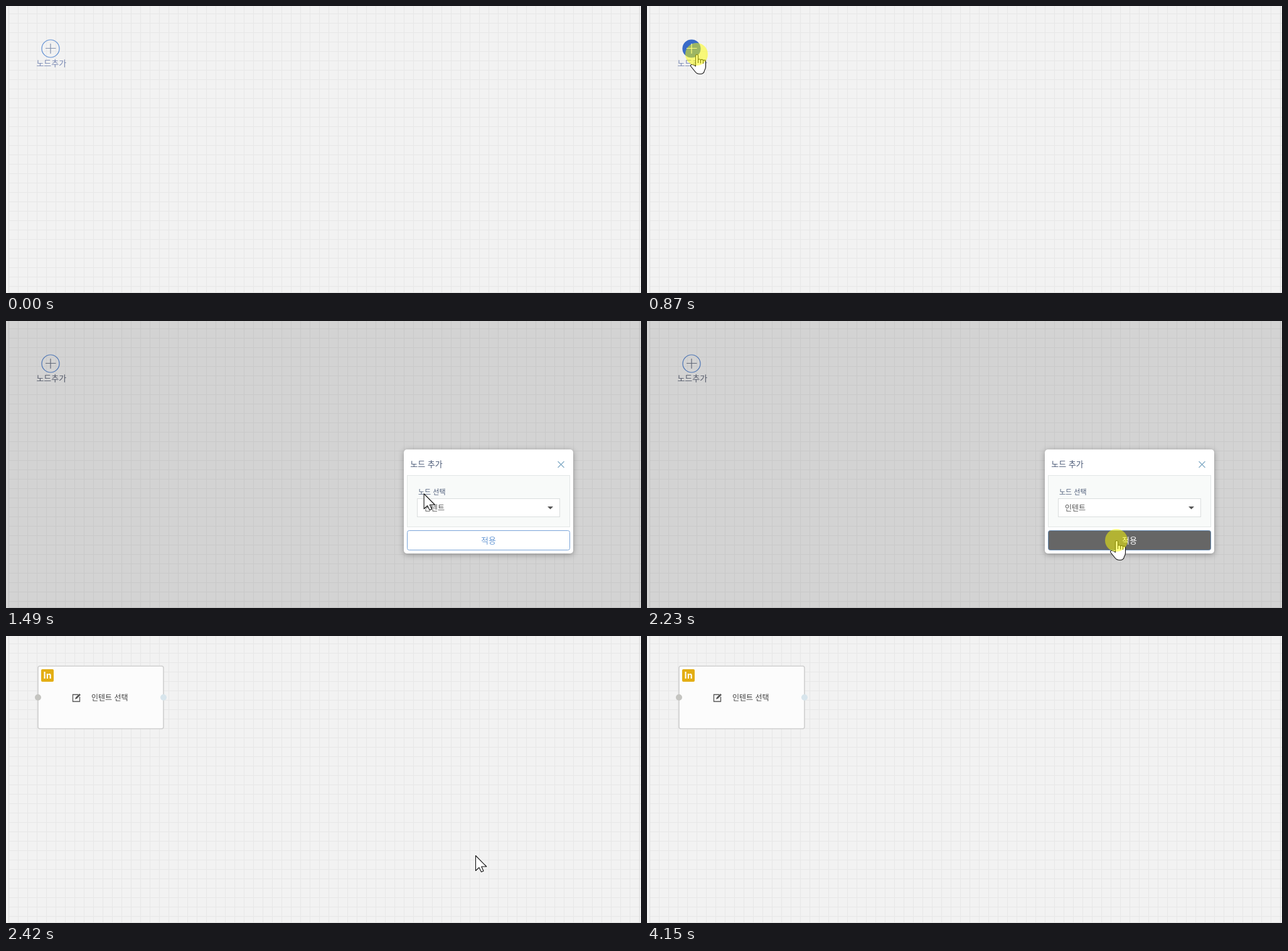
An HTML page that plays this animation: 1012 px wide and 458 px high, repeating every 4.22 s.

```html
<!DOCTYPE html>
<html lang="ko">
<head>
<meta charset="utf-8">
<title>노드 추가</title>
<style>
  html, body { margin: 0; height: 100%; overflow: hidden; background: #f2f2f2; }
  svg { display: block; width: 1012px; height: 458px; }
  text { font: 13px "Noto Sans CJK KR", "Noto Sans CJK", "Noto Sans", sans-serif; }
  .mid { text-anchor: middle; }
  .crisp { shape-rendering: crispEdges; }
  #add circle { fill: none; stroke: #5f8fd3; }
  #add path { stroke: #8391ad; }
  #add text { fill: #7a89b4; }
  #add.hover circle { fill: #396bc8; stroke: #396bc8; }
  #add.hover path { stroke: #fff; }
  #add.covered circle { stroke: #5584cf; }
  #add.covered path { stroke: #71798a; }
  #add.covered text { fill: #62687a; }
  #dialog { filter: drop-shadow(0 2px 5px rgba(0, 0, 0, .32)); }
  #apply rect { fill: #fff; stroke: #78a3d8; }
  #apply text { fill: #6b9bd6; }
  #apply.hover rect { fill: #666; stroke: #6489b0; }
  #apply.hover text { fill: #fff; font-weight: 500; }
</style>
</head>
<body>
<svg viewBox="0 0 1012 458">
  <defs>
    <pattern id="grid" x="4" y="12" width="15" height="15" patternUnits="userSpaceOnUse">
      <path class="crisp" d="M0 0H15V1H1V15H0Z" fill="#e7e7e7"/>
    </pattern>
  </defs>
  <rect width="1012" height="458" fill="#f2f2f2"/>
  <rect x="4" width="1008" height="458" fill="url(#grid)"/>
  <path class="crisp" d="M4.5 0V458M4 457.5H1012M1009.5 0V458" stroke="#dcdcdc"/>

  <g id="add">
    <circle cx="71" cy="68" r="14" stroke-width="1.2"/>
    <path d="M63 67.5H79.5M71 60V76" stroke-width="1.2"/>
    <text class="mid" x="72.3" y="95.5">노드추가</text>
  </g>

  <g id="node">
    <rect x="51" y="48" width="200" height="100" rx="3" fill="#fcfcfc" stroke="#cfcfcf" stroke-width="1.6"/>
    <circle cx="51" cy="98" r="5" fill="#c4c4c0"/>
    <circle cx="251" cy="98" r="5" fill="#d8e5ec"/>
    <rect x="56" y="53" width="20" height="20" rx="2" fill="#e3ae14"/>
    <text class="mid" x="66" y="68" fill="#fff" style="font-size:14px;font-weight:700">In</text>
    <path d="M115 93.5H106.5V104.5H117.5V97" fill="none" stroke="#555" stroke-width="1.3"/>
    <path d="M110 101L111 98L117 92L119 94L113 100Z" fill="#555"/>
    <text x="136" y="102.5" fill="#444" style="font-size:12px">인텐트 선택</text>
  </g>

  <rect id="shade" width="1012" height="458"/>

  <g id="dialog">
    <rect x="634" y="205" width="270" height="166" rx="5" fill="#fff"/>
    <text x="644.3" y="233" fill="#4c5b78">노드 추가</text>
    <path d="M879.5 224L889.5 234M889.5 224L879.5 234" stroke="#7fa9c4" stroke-width="1.1"/>
    <rect x="639.5" y="246.5" width="259" height="82" fill="#f8faf9" stroke="#e2e6e6"/>
    <text x="657" y="277" fill="#4c5b78" style="font-size:11px;font-weight:500">노드 선택</text>
    <rect x="655.5" y="283.5" width="227" height="29" fill="#fff" stroke="#dadede"/>
    <text x="666" y="302.8" fill="#555" style="font-size:12px">인텐트</text>
    <path d="M863 296H872L867.5 300.5Z" fill="#555"/>
    <g id="apply">
      <rect x="639.5" y="334.5" width="259" height="31" rx="3"/>
      <text class="mid" x="769" y="355">적용</text>
    </g>
  </g>

  <g id="loading">
    <rect width="1012" height="458" fill="#6f6f6f"/>
    <path class="crisp" d="M4.5 0V458M4 457.5H1012" stroke="#6a6a6a"/>
    <circle cx="715.5" cy="210.5" r="3.5" fill="#e6d071"/>
    <circle cx="726" cy="210.5" r=".8" fill="#e6d071"/>
    <text x="761" y="216" fill="#fff" style="font-size:15px;font-weight:700">진행중입니다.</text>
  </g>

  <g id="cursor" fill="#fff" stroke="#111" stroke-width="1.1" stroke-linejoin="round">
    <path id="arrow" d="M.5 .5V24.5L6 19.5L9.5 26.5L13 25L9.8 18H17.8Z"/>
    <g id="hand">
      <path d="M-1.5 19V2.5Q-1.3 .5 .6 .5Q2.5 .5 2.5 2.5V8.5Q4.5 6.7 6.5 9Q8.5 7.5 10.5 9.6Q14.5 8.6 14.5 12V20Q14.5 23 12.5 26Q12 31.5 5.5 31.5Q0 31.5 -2.5 27.5L-9 19.5Q-10.3 17.2 -8 16.5Q-5.5 16 -1.5 19Z"/>
      <path d="M2.5 8.5V14M6.5 9V14.5M10.5 9.6V15" fill="none"/>
    </g>
    <circle id="click" r="18" fill="#ff0" fill-opacity=".5" stroke="none"/>
  </g>
</svg>
<script>
const LOOP = 4220;
const OPEN = 1000, SUBMIT = 2360, DONE = 2420;
// Pointer path: time, x, y
const path = [
  [130, 699, 386], [260, 520, 290], [460, 170, 118], [600, 84, 79], [670, 79, 77],
  [1000, 79, 77], [1140, 82, 77], [1270, 205, 120], [1490, 664, 275], [1620, 873, 307],
  [1700, 873, 307], [1830, 798, 361], [1960, 748, 350],
  [2570, 748, 350], [2690, 610, 290], [2780, 517, 261], [2900, 640, 330], [3020, 800, 430], [3090, 860, 475]
];
const $ = id => document.getElementById(id);
const show = (id, on) => { $(id).style.display = on ? "" : "none"; };
const within = (t, from, to) => t >= from && t < to;

function pointerAt(t) {
  const i = path.findIndex(p => p[0] > t);
  if (i < 1) return null;
  const [t0, x0, y0] = path[i - 1], [t1, x1, y1] = path[i];
  const k = (t - t0) / (t1 - t0);
  return { x: x0 + (x1 - x0) * k, y: y0 + (y1 - y0) * k };
}

function draw(t) {
  const open = within(t, OPEN, SUBMIT);
  const fade = open ? Math.min(1, .4 + (t - OPEN) / 140) : 0;
  const p = pointerAt(t);
  const onAdd = !!p && t < OPEN && Math.hypot(p.x - 71, p.y - 68) < 18;
  const onApply = !!p && open && within(p.x, 639, 899) && within(p.y, 334, 366);

  show("add", t < SUBMIT);
  $("add").classList.toggle("hover", onAdd);
  $("add").classList.toggle("covered", open);
  $("shade").setAttribute("fill-opacity", .13 * fade);
  show("dialog", open);
  $("dialog").style.opacity = fade;
  $("apply").classList.toggle("hover", onApply);
  show("loading", within(t, SUBMIT, DONE));
  show("node", t >= DONE);

  show("cursor", p);
  if (p) $("cursor").setAttribute("transform", `translate(${p.x} ${p.y})`);
  show("hand", onAdd || onApply);
  show("arrow", !onAdd && !onApply);
  show("click", within(t, 740, OPEN) || within(t, 2100, SUBMIT));
}

const start = performance.now();
function tick() {
  draw((performance.now() - start) % LOOP);
  requestAnimationFrame(tick);
}
tick();
</script>
</body>
</html>
```
